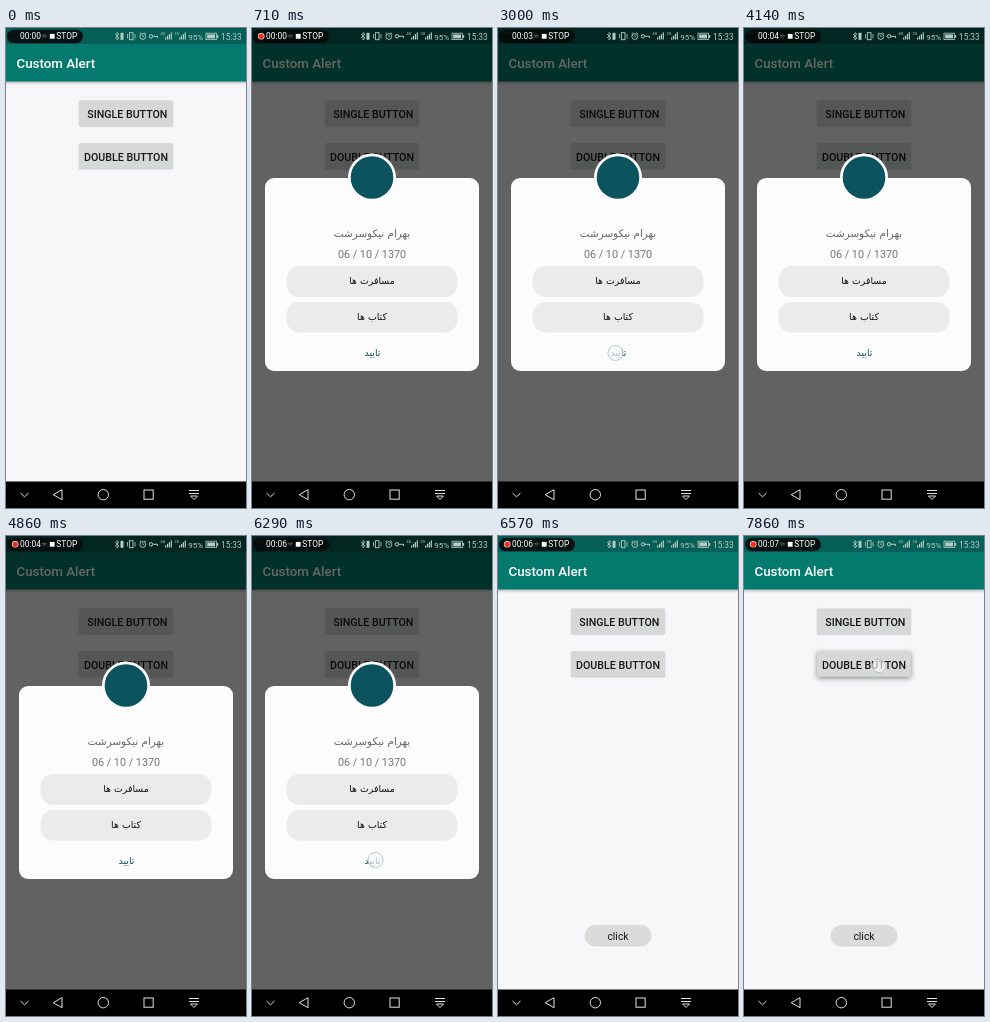
These frames come from a looping animation (240x480 px, 8 s). An HTML page with a canvas:

```html
<!DOCTYPE html>
<html lang="en">
<head>
<meta charset="utf-8">
<title>Custom Alert</title>
<style>
html, body { margin: 0; width: 100%; height: 100%; overflow: hidden; background: #f7f6f8; }
canvas { display: block; width: 240px; height: 480px; }
</style>
</head>
<body>
<canvas id="stage"></canvas>
<script>
const W = 240, H = 480, LOOP = 8000;
const ROBOTO = 'Roboto, sans-serif', ARABIC = '"DejaVu Sans", sans-serif';
const TEAL = '#0c5360';
const canvas = document.getElementById('stage');
const ctx = canvas.getContext('2d');
const ratio = window.devicePixelRatio || 1;
canvas.width = W * ratio;
canvas.height = H * ratio;

const clamp = v => Math.max(0, Math.min(1, v));
const ramp = (t, start, length) => clamp((t - start) / length);
const mix = (a, b, k) => a + (b - a) * k;
const grey = v => `rgb(${v},${v},${v})`;

const snap = t => 10 * Math.round(Math.floor((t + 5) * 7 / 1000) * 100 / 7);

function rect(x, y, w, h, color) {
  ctx.fillStyle = color;
  ctx.fillRect(x, y, w, h);
}

function round(x, y, w, h, r, color) {
  ctx.fillStyle = color;
  ctx.beginPath();
  ctx.roundRect(x, y, w, h, r);
  ctx.fill();
}

function disc(x, y, r, color) {
  ctx.fillStyle = color;
  ctx.beginPath();
  ctx.arc(x, y, r, 0, 7);
  ctx.fill();
}

function ring(x, y, r, color, width) {
  ctx.strokeStyle = color;
  ctx.lineWidth = width;
  ctx.beginPath();
  ctx.arc(x, y, r, 0, 7);
  ctx.stroke();
}

function path(points, color, width, closed) {
  ctx.strokeStyle = color;
  ctx.lineWidth = width;
  ctx.beginPath();
  points.forEach(([x, y]) => ctx.lineTo(x, y));
  if (closed) ctx.closePath();
  ctx.stroke();
}

function text(str, x, y, font, color, align = 'center') {
  ctx.font = font;
  ctx.fillStyle = color;
  ctx.textAlign = align;
  ctx.fillText(str, x, y);
}

function arabic(str, x, y, size, color) {
  ctx.direction = 'rtl';
  text(str, x, y, `${size}px ${ARABIC}`, color);
  ctx.direction = 'ltr';
}

function faded(alpha, draw) {
  if (alpha <= 0) return;
  ctx.save();
  ctx.globalAlpha = alpha;
  draw();
  ctx.restore();
}

function button(label, y, textX, lift) {
  ctx.save();
  ctx.shadowColor = `rgba(0,0,0,${mix(0.22, 0.45, lift)})`;
  ctx.shadowBlur = mix(1.5, 5, lift) * ratio;
  ctx.shadowOffsetY = mix(0.5, 1.5, lift) * ratio;
  round(73, y, 94, 25.5, 1.5, '#d6d7d7');
  ctx.restore();
  text(label, textX, y + 17.2, `500 10.67px ${ROBOTO}`, '#161616');
}

function page(t) {
  rect(0, 0, W, H, '#f7f6f8');
  const shadow = ctx.createLinearGradient(0, 53, 0, 57);
  shadow.addColorStop(0, 'rgba(0,0,0,.25)');
  shadow.addColorStop(1, 'rgba(0,0,0,0)');
  rect(0, 53, W, 4, shadow);
  rect(0, 0, W, 53.5, '#04796d');
  rect(0, 0, W, 16, '#065f56');
  text('Custom Alert', 10.5, 39.8, `500 13.33px ${ROBOTO}`, '#fff', 'left');
  button('SINGLE BUTTON', 72.5, 121.3, 0);
  button('DOUBLE BUTTON', 115.3, 120, ramp(t, 7600, 200));
}

function dialog() {
  round(13, 150, 214, 193, 9, '#fdfcfd');
  disc(120, 149.5, 24, '#fdfcfd');
  disc(120, 149.5, 21.3, TEAL);
  arabic('بهرام نیکوسرشت', 120, 208.5, 10.4, '#666');
  text('06 / 10 / 1370', 120, 229.8, `10.8px ${ROBOTO}`, '#757575');
  round(34.5, 238, 171, 31, 13, '#ebebec');
  round(34.5, 274, 171, 30.5, 13, '#ebebec');
  arabic('مسافرت ها', 120, 256.3, 9.4, '#111');
  arabic('کتاب ها', 120, 292, 9.4, '#111');
  arabic('تایید', 120.5, 328, 9.4, '#0c5356');
}

function touch(x, y, r) {
  disc(x, y, r, 'rgba(250,250,250,.65)');
  ring(x, y, r - 0.5, 'rgba(150,170,175,.65)', 1);
}

function toast(k) {
  if (k <= 0) return;
  round(86.5, 389, 67, 21.5, 10.75, grey(mix(226, 219, k)));
  text('click', 120, 403.6, `10.4px ${ROBOTO}`, grey(mix(140, 20, k)));
}

function signal(x, label, color) {
  text(label, x - 0.5, 7.2, `3.8px ${ROBOTO}`, color, 'left');
  for (let i = 0; i < 4; i++) rect(x + 4 + i * 1.9, 9.5 - i * 1.7, 1.2, 2 + i * 1.7, color);
}

function statusIcons() {
  const c = '#b6cbc8';
  path([[109, 6], [113, 10], [111, 12], [111, 4.5], [113, 6.3], [109, 10]], c, 0.8);
  rect(114.5, 4.8, 3, 7, c);
  ctx.strokeStyle = c;
  ctx.lineWidth = 0.9;
  ctx.strokeRect(123.4, 4.7, 3.6, 7);
  path([[121.5, 6], [121.5, 10.5]], c, 0.8);
  path([[129, 6], [129, 10.5]], c, 0.8);
  ring(136.8, 8.5, 2.9, c, 0.9);
  path([[136.8, 6.8], [136.8, 8.7], [138.2, 8.7]], c, 0.7);
  path([[133.5, 6], [135.2, 4.6]], c, 0.8);
  path([[138.4, 4.6], [140.1, 6]], c, 0.8);
  ring(145, 8.3, 1.7, c, 1);
  path([[146.7, 8.3], [151.5, 8.3], [151.5, 10]], c, 1);
  signal(155, '4G', c);
  signal(169, '2G', c);
  text('95%', 182.3, 11.6, `8px ${ROBOTO}`, c, 'left');
  ctx.strokeStyle = c;
  ctx.lineWidth = 0.8;
  ctx.strokeRect(200, 5.2, 10.5, 6.4);
  rect(201.2, 6.4, 7.8, 4, c);
  rect(211, 7, 1.2, 2.8, c);
  text('15:33', 215, 11.7, `8.3px ${ROBOTO}`, c, 'left');
}

function recorder(t) {
  text('Carrier', 5, 6, `4px ${ROBOTO}`, '#8aa5a2', 'left');
  round(1, 1.8, 76, 13.4, 6.7, 'rgba(6,10,10,.9)');
  if (t % 1000 >= 430) {
    disc(9.2, 8.3, 3.3, '#f2dcd8');
    disc(9.2, 8.3, 2.6, '#ee2c14');
  }
  text('00:0' + Math.floor(t / 1000), 14, 11.4, `8.4px ${ROBOTO}`, '#fff', 'left');
  ctx.lineCap = 'round';
  for (const r of [1.8, 3.5]) {
    ctx.strokeStyle = '#6e7c7a';
    ctx.lineWidth = 0.8;
    ctx.beginPath();
    ctx.arc(38.3, 10.4, r, -2.3, -0.8);
    ctx.stroke();
  }
  ctx.lineCap = 'butt';
  rect(43.8, 5.9, 4.8, 4.8, '#fff');
  text('STOP', 50.3, 11.4, `8.4px ${ROBOTO}`, '#fff', 'left');
}

function navBar() {
  const c = '#e4e4e4';
  rect(0, 453.5, W, 26.5, '#000');
  path([[14.5, 465], [18.5, 468.8], [22.5, 465]], c, 1);
  path([[47.2, 466.7], [56, 461.7], [56, 471.7]], c, 1, true);
  ring(97.3, 466.7, 5.2, c, 1);
  ctx.strokeStyle = c;
  ctx.strokeRect(138, 462, 9.2, 9.2);
  path([[183, 462.5], [193, 462.5]], c, 1);
  path([[183, 465.5], [193, 465.5]], c, 1);
  path([[184.5, 468], [191.5, 468], [188, 471.5]], c, 1, true);
}

function draw(t) {
  ctx.setTransform(ratio, 0, 0, ratio, 0, 0);
  page(t);
  const opened = ramp(t, 370, 200);
  const dim = 0.6 * opened * (1 - ramp(t, 6290, 168));
  rect(0, 0, W, 454, `rgba(0,0,0,${dim})`);
  faded(opened * (1 - ramp(t, 6290, 130)), () => {
    const s = mix(0.94, 1, opened);
    ctx.translate(120, 240);
    ctx.scale(s, s);
    ctx.translate(-120, -240);
    dialog();
  });
  toast(ramp(t, 6340, 240));
  if (t >= 2710 && t < 3140) touch(117.5, 325, 8);
  if (t >= 6000 && t < 6430) touch(123.5, 324, 8);
  if (t >= 7710) touch(135, 130, 7.2);
  statusIcons();
  recorder(t);
  navBar();
}

const begin = performance.now();
function tick() {
  draw(snap((performance.now() - begin) % LOOP) % LOOP);
  requestAnimationFrame(tick);
}
tick();
</script>
</body>
</html>
```
